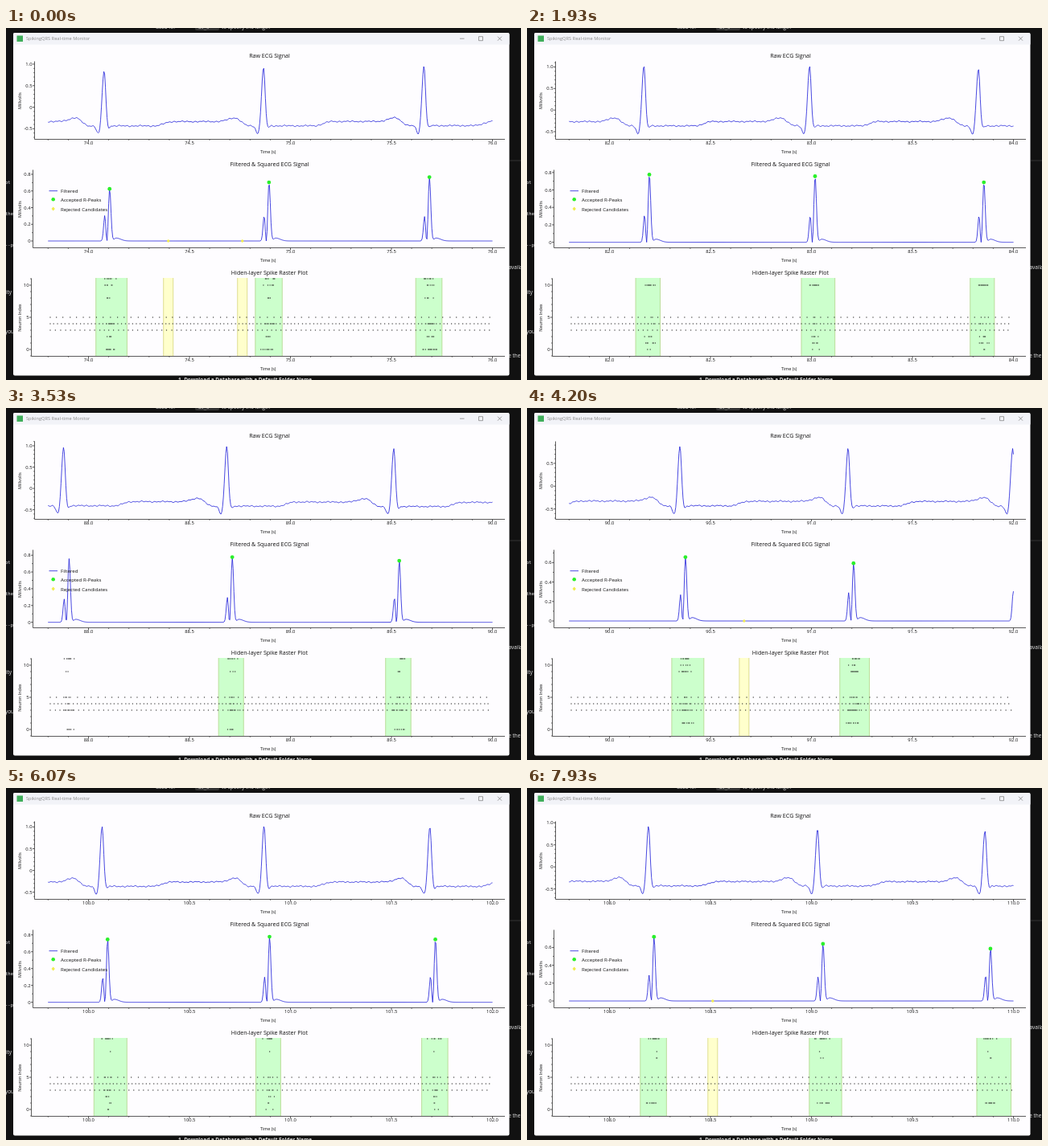
An HTML page for the animation above (8000 ms loop, 640 by 438 pixels).

```html
<!DOCTYPE html>
<html lang="en">
<head>
<meta charset="utf-8">
<title>ECG monitor</title>
<style>
html, body { margin: 0; width: 100%; height: 100%; overflow: hidden; background: #111; }
svg { display: block; width: 100vw; height: 100vh; }
text { font-family: "Open Sans", "Noto Sans", sans-serif; fill: #111; }
.desk text { fill: #e4e4e4; font-size: 6.4px; }
.desk .mono { font-family: "DejaVu Sans Mono", monospace; font-size: 5.6px; }
.title { font-size: 7.1px; }
.small { font-size: 5.8px; }
.time { font-size: 5.4px; }
.legend text { font-size: 6.15px; }
.axis { stroke: #333; stroke-width: .8; fill: none; }
.trace { stroke: #1c1cd8; stroke-width: .8; fill: none; stroke-linejoin: round; }
</style>
</head>
<body>
<svg viewBox="0 0 640 438">
  <rect width="640" height="438" fill="#111"/>
  <g class="desk">
    <text x="186" y="1">used for</text>
    <rect x="235" y="-6" width="30" height="9" rx="2" fill="#333"/>
    <text class="mono" x="239" y="1">dt_s</text>
    <text x="268" y="1">to specify the length</text>
    <text class="mono" x="-1" y="194">ot</text>
    <text class="mono" x="-1" y="233">the</text>
    <text class="mono" x="-1" y="272">--p</text>
    <text x="0" y="331">ity</text>
    <text x="-1" y="380">you</text>
    <path d="M626 165H640" stroke="#444" stroke-width=".7"/>
    <text x="624.5" y="300">availa</text>
    <text x="621" y="410">ve the</text>
    <text x="214" y="440" font-weight="700">1. Download a Database with a Default Folder Name</text>
  </g>
  <rect x="9" y="6" width="616.5" height="426.5" rx="2" fill="#fefdff"/>
  <path d="M9 20.5V8q0-2 2-2H623.5q2 0 2 2V20.5Z" fill="#f2f3f8"/>
  <rect x="13.5" y="9.5" width="7.5" height="7.5" fill="#3fae5a"/>
  <text x="25" y="15.3" font-size="5.7" style="fill:#8b8b8b">SpikingQRS Real-time Monitor</text>
  <path d="M564 13.2h5.5M587.5 10.7h5v5h-5zM611 10.7l5 5m0-5l-5 5" fill="none" stroke="#777" stroke-width=".7"/>
  <g id="plots"></g>
  <g class="legend">
    <path class="trace" d="M53.5 202.7H64"/>
    <circle cx="58.7" cy="213.2" r="2.3" fill="#2af02a"/>
    <path d="M58.7 222.5l2.2 2.5-2.2 2.5-2.2-2.5z" fill="#f0ec50"/>
    <text x="68" y="205">Filtered</text>
    <text x="68" y="216.4">Accepted R-Peaks</text>
    <text x="68" y="227.7">Rejected Candidates</text>
  </g>
</svg>
<script>
const LOOP = 8000, TICK = 1000 / 15, TICKS_PER_PAGE = 6.97;
const FIRST_END = 76, PAGE_STEP = 2, PAGES = 18;
const SPAN = 2.2, PX = 251, LEFT = 52.3, RIGHT = 604;
const DELAY = .027, SETTLE = .2;
const GREEN = "#2af02a", YELLOW = "#f0ec50";

const rnd = n => { const v = Math.sin(n * 127.1 + 11.7) * 43758.5453; return v - Math.floor(v); };
const bell = (x, s) => Math.exp(-x * x / (2 * s * s));
const wave = (x, period) => Math.cos(2 * Math.PI * x / period);
const smooth = x => { x = Math.min(1, Math.max(0, x)); return x * x * (3 - 2 * x); };
const fix = v => v.toFixed(2);

// A steady pulse whose timing and height sway with the breath.
function beat(k) {
  const breath = wave(k - 2.6, 7.6);
  return {
    t: 74.072 + .81295 * k - .03 * breath - .011 * wave(k, 44),
    height: .925 + .07 * breath,
    first: .33 + .06 * (rnd(k) - .5),
    second: .7 + .1 * breath,
    reach: 13 + 13 * rnd(k + .5)
  };
}
const beats = Array.from({ length: 50 }, (_, i) => beat(i - 2));

function raw(t) {
  const i = beats.findIndex(b => b.t > t);
  const since = t - beats[i - 1].t, until = t - beats[i].t;
  let v = -.4 + .035 * wave(t - 83, 17.9)
    + .1 * smooth((since - .25) / .09) * (1 - smooth((until + .13) / .06))
    + .085 * bell(until + .143, until < -.143 ? .032 : .02)
    + .008 * wave(t, .021) + .006 * wave(t, .034) + .006 * wave(t, .103);
  for (const b of beats) {
    const d = t - b.t;
    if (Math.abs(d) > .1) continue;
    v += (b.height + .4) * bell(d, d < 0 ? .0097 : .0077)
      - .2 * bell(d + .027, .0095) - .05 * bell(d - .022, .006);
  }
  return v;
}

function filtered(t) {
  let v = 0;
  for (const b of beats) {
    const d = t - b.t;
    if (Math.abs(d) > .15) continue;
    const w = Math.sqrt(b.second) * bell(d - DELAY, .0093) - Math.sqrt(b.first) * bell(d - .004, .0083);
    v += w * w + .035 * bell(d - .06, d < .06 ? .01 : .022);
  }
  return v;
}

const label = (x, y, s, anchor = "middle", cls = "small") =>
  `<text class="${cls}" x="${fix(x)}" y="${fix(y)}" text-anchor="${anchor}">${s}</text>`;
const dot = (x, y, r, fill) => `<circle cx="${fix(x)}" cy="${fix(y)}" r="${r}" fill="${fill}"/>`;
const band = (l, r, fill, edge) =>
  `<rect x="${fix(l)}" y="311" width="${fix(r - l)}" height="97" fill="${fill}"/>`
  + `<path d="M${fix(l)} 311V408M${fix(r)} 311V408" stroke="${edge}" stroke-width=".8"/>`;
const trace = (values, yOf) =>
  `<path class="trace" d="M${values.map((v, i) => fix(LEFT + i * .004 * PX) + " " + fix(yOf(v))).join("L")}"/>`;

function axes({ top, x, title, unit, end, yOf, minor, every, digits }) {
  const bottom = top + 97;
  let d = `M${x} ${top}V${bottom}H620`, out = "";
  for (let k = 0; k <= 22; k++) {
    const tx = LEFT + k * .1 * PX, major = k % 5 === 2;
    d += `M${fix(tx)} ${bottom}v${major ? 2.5 : 1.3}`;
    if (major) out += label(tx, bottom + 6.8, (end - SPAN + k * .1).toFixed(1));
  }
  for (let k = -20; k <= 20; k++) {
    const ty = yOf(k * minor), major = k % every === 0;
    if (ty < top || ty > bottom) continue;
    d += `M${x} ${fix(ty)}h${major ? -2.5 : -1.3}`;
    if (major) out += label(x - 3, ty + 2, k ? (k * minor).toFixed(digits) : "0", "end");
  }
  return out + `<path class="axis" d="${d}"/>`
    + label(327.5, top - 4.7, title, "middle", "title")
    + label(325.7, bottom + 17.8, "Time (s)", "middle", "time")
    + `<text class="time" text-anchor="middle" transform="translate(19 ${top + 49}) rotate(-90)">${unit}</text>`;
}

function spikes(end, peaks) {
  let d = "";
  const spike = (x, n) => { if (x > LEFT && x < RIGHT) d += `M${fix(x - .6)} ${400 - 8 * n}h1.2`; };
  for (const n of [3, 4, 5]) {
    const step = n === 5 ? 8.4 : n === 4 ? 4.6 : 6;
    for (let k = 0, x = 55; x < 603; k++, x += step * (.9 + .2 * rnd(end * n + k))) spike(x, n);
  }
  // Outer neurons fire around each beat, the ones near 6 and 7 stay quiet.
  for (let n = 0; n <= 11; n++) {
    const drive = rnd(end * 12 + n) * Math.min(1, Math.abs(n - 6.5) / 2.5);
    const count = Math.round(24 * (drive - .4));
    peaks.forEach(({ x }, i) => {
      for (let k = 0; k < count; k++) {
        const u = rnd(end + i * 31 + n * 7 + k * 1.37) + rnd(end + i * 17 + n * 5 + k * 2.11) - 1;
        spike(x + u * (5 + count / 2), n);
      }
    });
  }
  return `<path d="${d}" stroke="#181818" stroke-width="1.2"/>`;
}

function drawPage(index) {
  const end = FIRST_END + PAGE_STEP * index, start = end - SPAN;
  const xOf = t => LEFT + (t - start) * PX;
  const times = Array.from({ length: 551 }, (_, i) => start + i * .004);
  const ecg = times.map(raw), power = times.map(filtered);
  const seen = beats.map(b => ({ ...b, x: xOf(b.t + DELAY) })).filter(b => b.x > LEFT && b.x < RIGHT);
  const accepted = seen.filter(b => b.t > start + SETTLE);

  // T and P waves of the first beat are sometimes taken for candidates.
  const doubts = Math.max(0, Math.floor(1.1 + 1.4 * wave(index, 9.5)));
  const refused = Array.from({ length: doubts }, (_, j) => accepted[0].x + 73 + 92 * j);

  const lo = Math.min(...ecg), hi = Math.max(...ecg), top = Math.max(...power);
  const zero = doubts ? 265 : 266.6;
  const ecgY = v => 132 - (v - lo) / (hi - lo) * 84;
  const powerY = v => zero - v / top * (zero - 185.5);
  const neuronY = n => 400 - 8 * n;

  return axes({ top: 41.5, x: 35.5, title: "Raw ECG Signal", unit: "Millvolts", end, yOf: ecgY, minor: .1, every: 5, digits: 1 })
    + trace(ecg, ecgY)
    + axes({ top: 176.5, x: 33.5, title: "Filtered &amp; Squared ECG Signal", unit: "Millvolts", end, yOf: powerY, minor: .1, every: 2, digits: 1 })
    + trace(power, powerY)
    + accepted.map(b => dot(b.x, powerY(filtered(b.t + DELAY)), 2.4, GREEN)).join("")
    + refused.map(x => dot(x, zero, 1.7, YELLOW)).join("")
    + accepted.map(b => band(b.x - 17, b.x + b.reach, "#ccffcc", "#b2d68a")).join("")
    + refused.map(x => band(x - 6, x + 6, "#ffffcc", "#d6d67c")).join("")
    + axes({ top: 311.5, x: 31.5, title: "Hiden-layer Spike Raster Plot", unit: "Neuron Index", end, yOf: neuronY, minor: 1, every: 5, digits: 0 })
    + spikes(end, seen);
}

const plots = document.getElementById("plots");
const pages = Array.from({ length: PAGES }, (_, i) => drawPage(i));
let shown = -1;

// The window advances two seconds of signal about every seven video ticks.
function render(ms) {
  const tick = Math.floor((ms % LOOP + 5) / TICK);
  const page = Math.min(PAGES - 1, Math.max(0, Math.floor((tick - .36) / TICKS_PER_PAGE)));
  if (page !== shown) plots.innerHTML = pages[shown = page];
}
function loop() {
  render(performance.now());
  requestAnimationFrame(loop);
}
loop();
</script>
</body>
</html>
```
